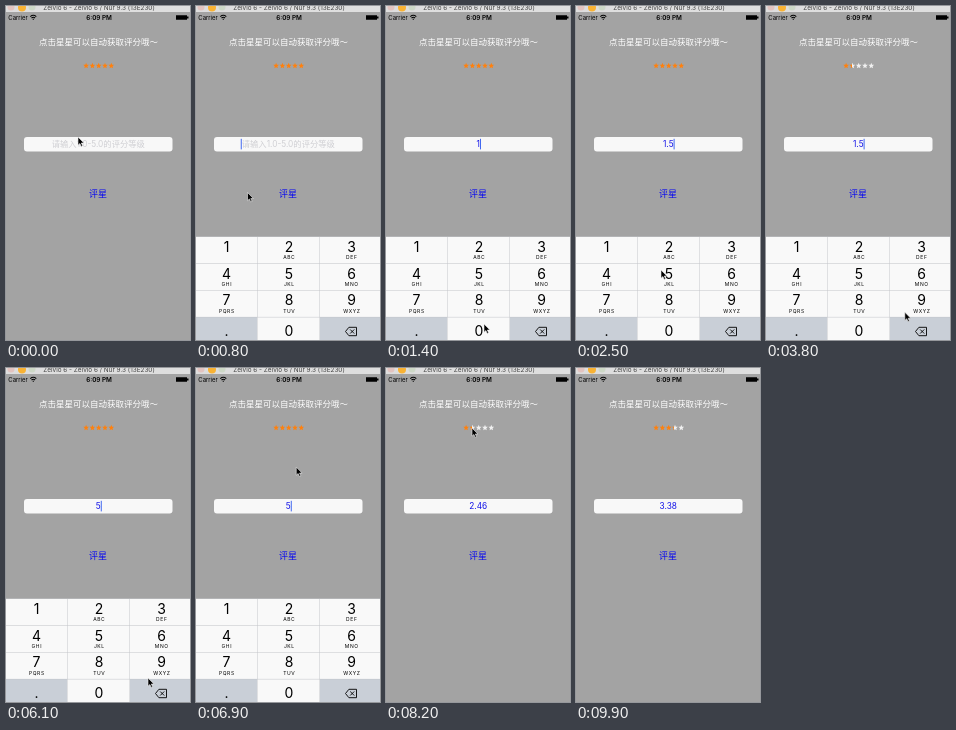
Recreate the animation shown at these times as an HTML page. Size 184 by 334 pixels, loop 10000 ms.

```html
<!DOCTYPE html>
<html lang="zh">
<head>
<meta charset="utf-8">
<style>
  html, body { margin: 0; width: 100%; height: 100%; overflow: hidden; background: #a3a3a3; }
  svg { display: block; width: 184px; height: 334px; }
  text { font-family: Inter, "Noto Sans CJK SC", "Noto Sans CJK", sans-serif; text-anchor: middle; }
  .digit { font-size: 14px; }
  .letters { font-size: 5px; letter-spacing: .6px; }
</style>
</head>
<body>
<svg viewBox="0 0 184 334">
  <linearGradient id="score" gradientUnits="userSpaceOnUse" x1="77" x2="108.5">
    <stop class="edge" stop-color="#ff800c"/>
    <stop class="edge" stop-color="#f0f0f0"/>
  </linearGradient>
  <rect width="184" height="334" fill="#a3a3a3"/>

  <rect width="184" height="6" fill="#dedede"/>
  <circle cx="5" cy="1" r="3.5" fill="#e3c4c0"/>
  <circle cx="16" cy="1.5" r="4" fill="#f9b233"/>
  <circle cx="26" cy="1" r="3.5" fill="#cdd8c6"/>
  <text x="93" y="4.2" font-size="6.4" fill="#444">Zelvio 6 - Zelvio 6 / Nur 9.3 (13E230)</text>

  <text x="12" y="13.6" font-size="5.9">Carrier</text>
  <path d="M24.3 10.6q3-2.6 6 0M25.5 12q1.8-1.5 3.6 0M26.7 13.3h1.2" fill="none" stroke="#000" stroke-width="1.1"/>
  <text x="93" y="13.7" font-size="6.3" font-weight="600">6:09 PM</text>
  <path d="M170 9.3h11v1.3h1.5v1.8H181v1.3H170z"/>

  <text x="92.5" y="39.3" font-size="8.5" fill="#fff">点击星星可以自动获取评分哦～</text>
  <g id="stars" fill="url(#score)"></g>

  <rect x="18" y="131" width="148.5" height="14.5" rx="3" fill="#f8f8f8"/>
  <text id="entry" x="92.3" y="141.2" font-size="8.3"></text>
  <rect id="caret" y="132.8" width="1" height="10.6" fill="#4168f0"/>
  <text x="92" y="191.3" font-size="9" fill="#0808f0">评星</text>

  <g id="keyboard"></g>
  <path id="pointer" d="M0 0V8.2L1.9 6.5 3.2 9.4 4.6 8.8 3.3 6H5.9Z" stroke="#eee" stroke-width=".6"/>
</svg>
<script>
const $ = id => document.getElementById(id);
const LOOP = 10000, TRAVEL = 400, SLIDE = 400, FILL = 200, LABEL_LAG = 350;
const FOCUS = 300, BLUR = 7000, POINTER_GONE = 9700;
const HINT = '请输入1.0-5.0的评分等级';
const WHITE = '#f9f9f9', GREY = '#c9cfd7';

const ease = v => (v = Math.max(0, Math.min(1, v))) * v * (3 - 2 * v);
const mix = (a, b, p) => a + (b - a) * p;

// Five stars
const star = cx => 'M' + Array.from({length: 10}, (_, i) => {
  const a = i * Math.PI / 5, r = i % 2 ? 1.35 : 3;
  return `${cx + r * Math.sin(a)} ${59.8 - r * Math.cos(a)}`;
}).join('L') + 'Z';
for (let i = 0; i < 5; i++) $('stars').innerHTML += `<path d="${star(80.1 + i * 6.3)}"/>`;

// Numeric keypad
const KEYS = [...'123456789.0⌫'];
const LETTERS = ' ABC DEF GHI JKL MNO PQRS TUV WXYZ'.split(' ');
const DELETE_ICON = '<path d="M149.5 325.5l3.4-4.2h7.6v8.4h-7.6zM154.2 323.5l4 4m0-4l-4 4" fill="none" stroke="#000" stroke-width=".9"/>';
const keyColor = (key, down) => '.⌫'.includes(key) !== down ? GREY : WHITE;
$('keyboard').innerHTML = '<rect y="230.5" width="184" height="104" fill="#c4c6ca"/>' +
  KEYS.map((key, i) => {
    const x = i % 3 * 62.5, y = 231 + 26.8 * Math.floor(i / 3), left = x && x - 1;
    const label = key === '⌫' ? DELETE_ICON
      : `<text class="digit" x="${x + 30.5}" y="${y + (i > 8 ? 18.5 : 14.7)}">${key}</text>`;
    return `<rect class="key" x="${left}" y="${y}" width="${x + 61 - left}" height="26.3"/>${label}
      <text class="letters" x="${x + 30.8}" y="${y + 22.2}">${LETTERS[i] || ''}</text>`;
  }).join('');
const keyRects = document.querySelectorAll('.key');

// Pointer stops: time, x, y and what is tapped there (a key, "rate", or a star score)
const STOPS = [
  [FOCUS, 72, 131], [1000, 31, 242, '1'], [1400, 98, 318], [1800, 32, 322, '.'],
  [2300, 85, 264, '5'], [2900, 92, 186, 'rate'],
  [3900, 147.5, 328.5, '⌫'], [4150, 147.5, 328.5, '⌫'], [4400, 147.5, 328.5, '⌫'],
  [5300, 90, 268, '5'], [5700, 92, 186, 'rate'], [6100, 142, 310],
  [BLUR, 92.5, 60, 2.46], [7950, 86, 60, 1.46], [9400, 97.5, 60, 3.38]
].map(([at, x, y, tap]) => ({at, x, y, tap}));

function pointerAt(t) {
  const next = STOPS.findIndex(s => s.at > t);
  if (next < 0) return STOPS.at(-1);
  const b = STOPS[next], a = STOPS[next - 1] || b;
  const p = ease(1 - (b.at - t) / Math.min(TRAVEL, b.at - a.at));
  return {x: mix(a.x, b.x, p), y: mix(a.y, b.y, p)};
}

// Replays every tap up to time t
function stateAt(t) {
  let text = '', score = 5;
  for (const {at, tap} of STOPS) {
    if (at > t || !tap) continue;
    const rated = typeof tap === 'number';
    if (rated || tap === 'rate') score = mix(score, rated ? tap : +text, ease((t - at) / FILL));
    else text = tap === '⌫' ? text.slice(0, -1) : text + tap;
    if (rated && t >= at + LABEL_LAG) text = String(tap);
  }
  return {text, score};
}

function draw(t) {
  const {text, score} = stateAt(t), entry = $('entry');
  entry.textContent = text || HINT;
  entry.setAttribute('fill', text ? '#1212e8' : '#cfcfd3');

  const half = entry.getComputedTextLength() / 2;
  $('caret').setAttribute('x', 92.3 + (text ? half : -half - 1));
  $('caret').setAttribute('opacity', +(t >= FOCUS && t < BLUR));

  document.querySelectorAll('.edge').forEach(e => e.setAttribute('offset', score / 5));

  const shown = ease((t - FOCUS) / SLIDE) - ease((t - BLUR) / SLIDE);
  $('keyboard').setAttribute('transform', `translate(0 ${(1 - shown) * 105})`);
  const pressed = STOPS.find(s => t >= s.at && t < s.at + 100)?.tap;
  keyRects.forEach((r, i) => r.setAttribute('fill', keyColor(KEYS[i], KEYS[i] === pressed)));

  const {x, y} = pointerAt(t);
  $('pointer').setAttribute('transform', `translate(${x} ${y})`);
  $('pointer').setAttribute('opacity', +(t < POINTER_GONE));
}

const start = performance.now();
function tick() {
  const t = (performance.now() - start) % LOOP;
  draw(Math.floor(t / 100) * 100);
  requestAnimationFrame(tick);
}
tick();
</script>
</body>
</html>
```
